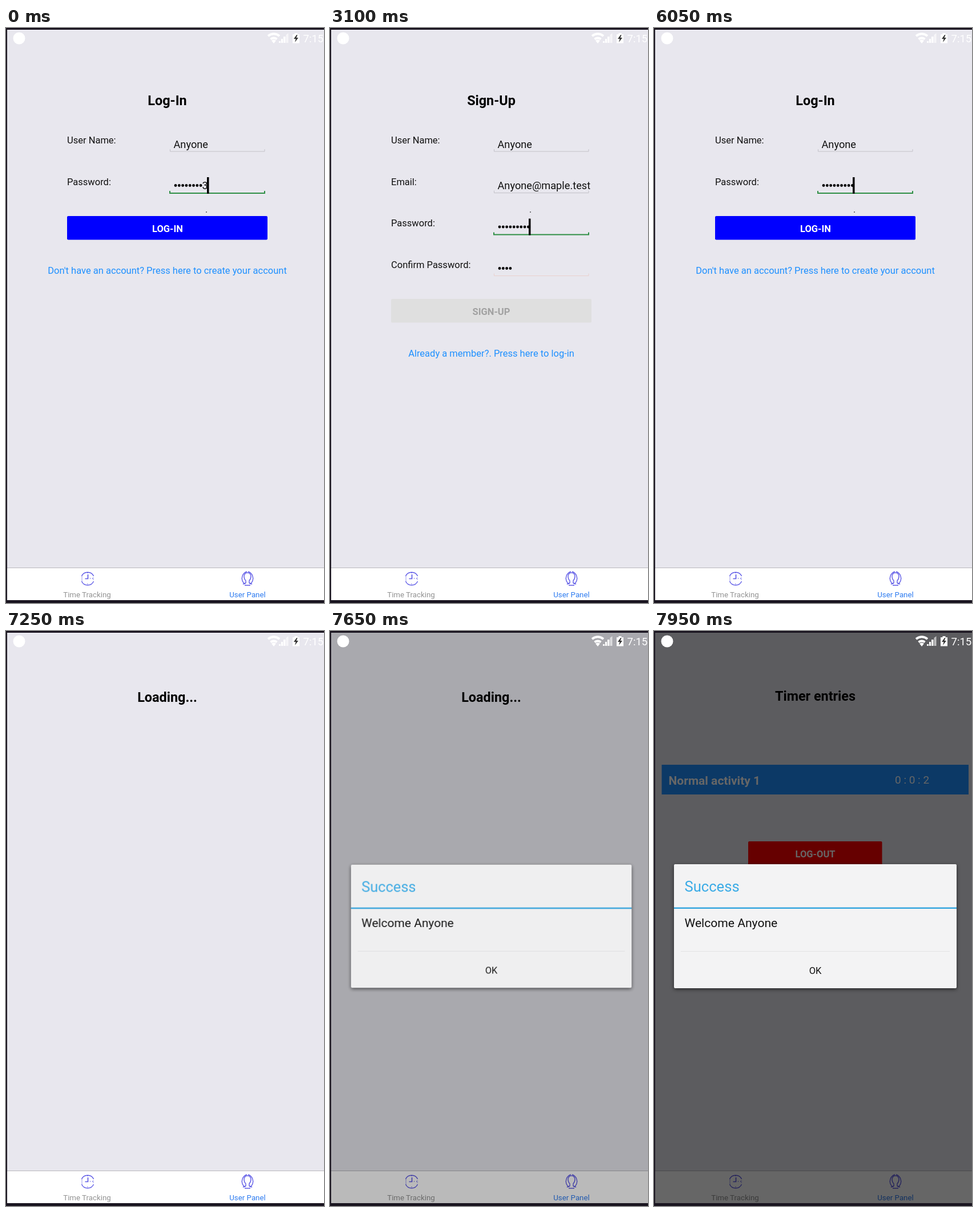
These frames come from a looping animation (557x1006 px, 8000 ms). An HTML page:

```html
<!DOCTYPE html>
<html lang="en">
<head>
<meta charset="utf-8">
<title>Log-in flow</title>
<style>
  html, body { margin: 0; width: 100%; height: 100%; overflow: hidden; background: #1a1520; }
  svg { display: block; width: 100vw; height: 100vh; }
  text { font: 16.5px Roboto, sans-serif; fill: #111; white-space: pre; }
  .mid { text-anchor: middle; }
  .title { font-size: 23.4px; font-weight: 700; fill: #000; }
  .button { font-weight: 700; fill: #fff; }
  .input { font-size: 18.2px; }
  .link { fill: #1e90ff; }
  .pressed { fill: #14599f; }
  .tab { font-size: 13.3px; fill: #939393; }
  .line { fill: none; stroke: #c3c2c8; }
  .focus { stroke: #2f8f45; stroke-width: 2; }
  .error { stroke: #ead0cd; }
  .icon { fill: none; stroke: #5f5be6; stroke-width: 1.4; }
  #dialog { transform-origin: 282.5px 516.5px; filter: drop-shadow(0 2px 3px #0009); }
</style>
</head>
<body>
<svg viewBox="0 0 557 1006">
  <rect width="557" height="1006" fill="#1a1520"/>
  <rect x="2" y="3" width="555" height="998" fill="#e8e7ee"/>

  <g id="login">
    <text class="title mid" x="282.5" y="135">Log-In</text>
    <g id="loginFields"></g>
    <text class="input" id="lastDigit" x="343.5" y="282">3</text>
    <rect id="cursorWide" x="352" y="261" width="3.5" height="29"/>
    <rect id="loginCursor" x="348" y="261" width="3.5" height="29"/>
    <rect x="107" y="329" width="351" height="41.5" rx="2" fill="#00f"/>
    <text class="button mid" x="283" y="356.5">LOG-IN</text>
    <rect id="loginPress" x="71" y="411" width="423" height="24"/>
    <text class="link mid" id="loginLink" x="282.5" y="430">Don't have an account? Press here to create your account</text>
    <rect x="350" y="321.5" width="2" height="1"/>
  </g>

  <g id="signup">
    <text class="title mid" x="282.5" y="135">Sign-Up</text>
    <g id="signupFields"></g>
    <rect id="signupCursor" x="348" y="333.5" width="3.5" height="29"/>
    <rect x="107" y="474" width="351" height="41.5" rx="2" fill="#dfdfdf"/>
    <text class="button mid" x="282.5" y="501.5" style="fill:#a1a1a1">SIGN-UP</text>
    <rect id="signupPress" x="137.5" y="556" width="290" height="23.5"/>
    <text class="link mid" id="signupLink" x="282.5" y="575">Already a member?. Press here to log-in</text>
    <rect x="350" y="321.5" width="2" height="1"/>
  </g>

  <text class="title mid" id="loading" x="282.5" y="123.5">Loading...</text>
  <text class="title mid" id="empty" x="282.5" y="55.5" style="font-size:23px">There are no timer entries.</text>

  <g id="entries">
    <text class="title mid" x="282.5" y="122">Timer entries</text>
    <rect x="13.5" y="234" width="537.5" height="52" fill="#1e90ff"/>
    <text x="25.5" y="268.5" style="font-size:21px;font-weight:700;fill:#fff">Normal activity 1</text>
    <text x="422" y="266.5" style="font-size:19px;fill:#fff">0 : 0 : 2</text>
    <rect x="165" y="368" width="234.5" height="42" rx="2" fill="#f00"/>
    <text class="button mid" x="282.5" y="395.5">LOG-OUT</text>
  </g>

  <rect x="2" y="944" width="555" height="57" fill="#fff"/>
  <rect x="2" y="944" width="555" height="1" fill="#b8b7bd"/>
  <g class="icon">
    <path d="M132.500 959a11.500 11.500 0 0 1 21 0M132.500 968a11.500 11.500 0 0 0 21 0"/>
    <path d="M133 959v9M153 961v5" stroke-width=".6"/>
    <path d="M143.500 956v7.500h-5" stroke-width="1.700"/>
    <path d="M143 953v1M143 972v1M151 963h1M147 963h1"/>
    <path d="M419 973a11.500 11.500 0 0 1-5-14q2-6 8-8M427 973a11.500 11.500 0 0 0 5-14q-2-6-8-8"/>
    <path d="M415 973l5-2v-4q-3-3-3-8 1-6 6-6t6 6q0 5-3 8v4l5 2M418 975h10"/>
  </g>
  <text class="tab mid" x="142" y="995.5">Time Tracking</text>
  <text class="tab mid" x="423" y="995.5" style="fill:#2f7cf0">User Panel</text>

  <rect id="dim" x="2" y="3" width="555" height="998"/>

  <g fill="#fff">
    <circle cx="23" cy="18" r="10.5"/>
    <path d="M469 27l-4-5q4-3 8 0z"/>
    <path d="M463.500 19.500q5.500-4 11 0M459 14q10-7.500 20 0" fill="none" stroke="#fff" stroke-width="4"/>
    <path d="M478 26v-3h3v3zM482 26v-7h3v7zM486 26v-11h3.500v11z"/>
    <path d="M490.500 26v-14l4-3v17z" opacity=".6"/>
    <path d="M502 11h3.500v-2h5v2h3.500v15.500h-12z"/>
    <path d="M509 12l-5 7h3.500l-1.500 6 6-8h-3.500l2-5z" fill="#333"/>
    <text x="520.500" y="25" style="font-size:18.500px;fill:#fff">7:15</text>
  </g>

  <g id="dialog">
    <rect x="35" y="408" width="495" height="217" rx="2" fill="#f3f3f4"/>
    <text x="53.500" y="456" style="font-size:25.600px;fill:#3aabe6">Success</text>
    <rect x="35" y="483.500" width="495" height="2.500" fill="#36a6df"/>
    <text x="53.500" y="518" style="font-size:21.100px">Welcome Anyone</text>
    <rect x="47" y="560" width="471" height="1" fill="#e2e2e4"/>
    <text class="mid" x="282.500" y="600">OK</text>
  </g>
</svg>
<script>
const LOOP = 8000, ROW = 72.5;
const byId = id => document.getElementById(id);

const dots = count => Array.from({ length: count }, (_, i) =>
  `<circle cx="${297 + 6.3 * i}" cy="275.500" r="2.400"/>`).join('');

// A row holds a label, its value and an underline with end ticks.
function field(row, label, value, state = '') {
  const y = row * ROW;
  const under = state === 'focus' ? 'M287 285v4h166v-4' : 'M287.500 284.500v4h165.500v-4';
  const content = typeof value === 'number'
    ? `<g transform="translate(0 ${-ROW})">${dots(value)}</g>`
    : `<text class="input" x="293.500" y="209.500">${value}</text>`;
  return `<g transform="translate(0 ${y})"><text x="107" y="202">${label}</text>${content}
    <path class="line ${state}" transform="translate(0 ${-ROW})" d="${under}"/></g>`;
}

byId('loginFields').innerHTML =
  field(0, 'User Name:', 'Anyone') +
  field(1, 'Password:', 8, 'focus') +
  '<circle id="lastDot" cx="347.400" cy="275.500" r="2.400"/>';
byId('signupFields').innerHTML =
  field(0, 'User Name:', 'Anyone') +
  field(1, 'Email:', 'Anyone@maple.test') +
  field(2, 'Password:', 9, 'focus') +
  field(3, 'Confirm Password:', 4, 'error');

// Each step is [time, value]; a value holds until the next step.
function play(id, prop, steps) {
  const frames = steps.map(([time, value]) =>
    ({ offset: time / LOOP, [prop]: value, easing: 'steps(1, end)' }));
  frames.push({ offset: 1, [prop]: steps.at(-1)[1] });
  byId(id).animate(frames, { duration: LOOP, iterations: Infinity });
}

// Visible from each odd entry until the next one.
function show(id, ...toggles) {
  const steps = toggles.map((time, i) => [time, i % 2 ? 0 : 1]);
  if (toggles[0] > 0) steps.unshift([0, 0]);
  play(id, 'opacity', steps);
}

show('login', 0, 1650, 5300, 7200);
show('lastDigit', 0, 500);
show('lastDot', 500);
show('cursorWide', 0, 500);
show('loginCursor', 1000, 1500, 5300, 5550, 6000, 6500, 7050);
show('loginPress', 5300, 5400);
play('loginLink', 'fill', [[0, '#1e90ff'], [5300, '#14599f'], [5400, '#1e90ff']]);

show('signup', 1650, 5300);
show('signupCursor', 2000, 2500, 3050, 3550, 4050, 4500, 5000);
show('signupPress', 1650, 1900);
play('signupLink', 'fill', [[0, '#14599f'], [1900, '#1e90ff']]);

play('loading', 'opacity', [[0, 0], [7200, 1], [7700, .5], [7800, 0]]);
play('empty', 'opacity', [[0, 0], [7700, .5], [7800, 0]]);
show('entries', 7800);

const ramp = values => [[0, values[0]], ...values.slice(1).map((v, i) => [7500 + 50 * i, v])];
play('dim', 'opacity', ramp([0, .02, .06, .13, .27, .4, .5, .57, .6]));
play('dialog', 'opacity', ramp([0, .1, .4, .75, .95, 1]));
play('dialog', 'transform', ramp([.9, .92, .95, .974, .993, 1].map(s => `scale(${s})`)));
</script>
</body>
</html>
```
